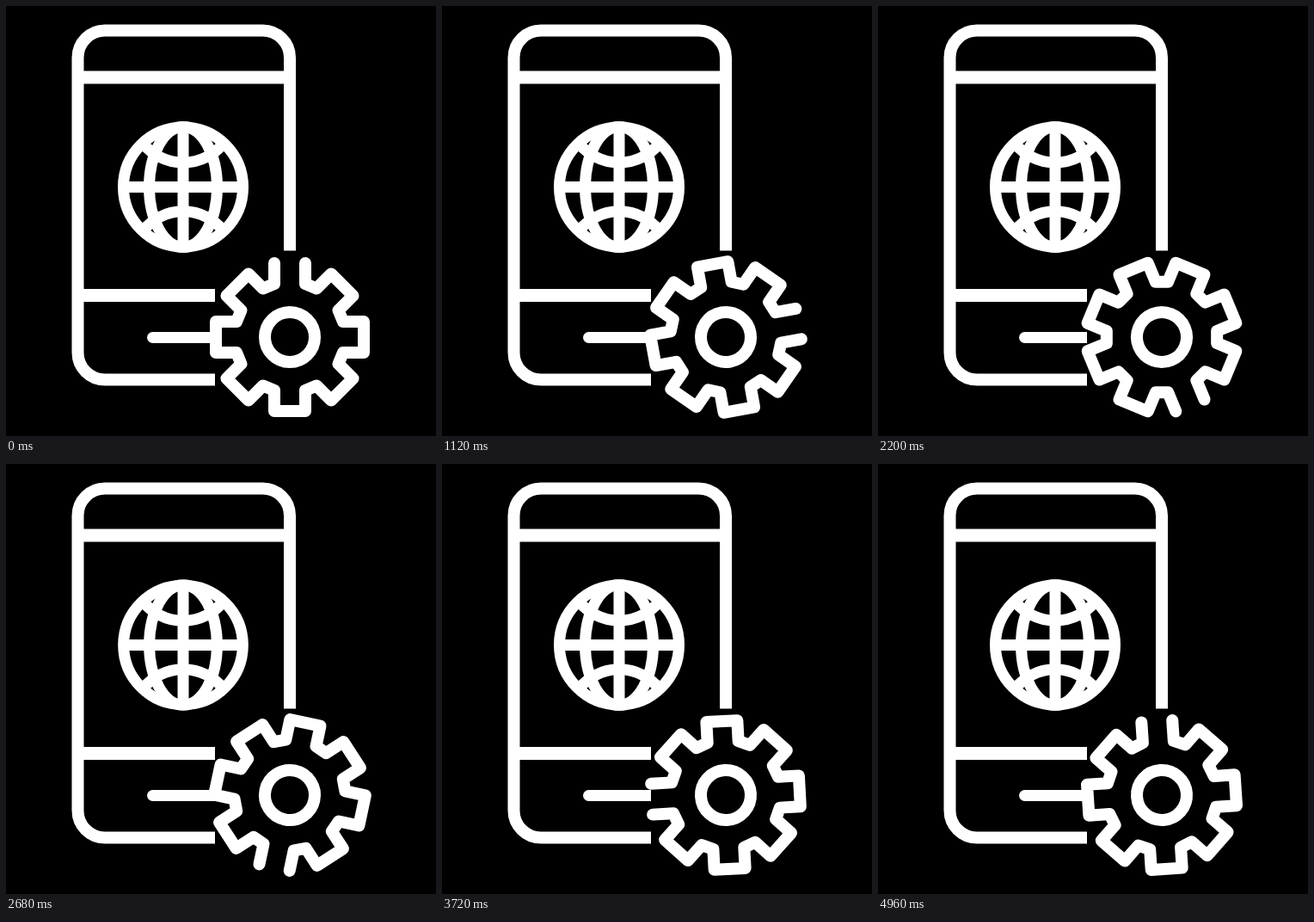
Recreate the animation shown at these times as an HTML page. Size 500 by 500 pixels, loop 5 s.

```html
<!DOCTYPE html>
<html lang="en">
<head>
<meta charset="utf-8">
<title>Mobile web settings</title>
<style>
  html, body { margin: 0; width: 100%; height: 100%; overflow: hidden; background: #000; }
  svg { display: block; width: 100vw; height: 100vh; }
</style>
</head>
<body>
<svg viewBox="0 0 500 500" fill="none" stroke="#fff" stroke-width="14">
  <g id="phone">
    <path d="M243 434.5H115a31.5 31.5 0 0 1-31.5-31.5V60A31.5 31.5 0 0 1 115 28.5H298.500A31.5 31.5 0 0 1 330 60V284.500"/>
    <path d="M84 83H330M84 336.500H243" stroke-width="15"/>
    <path d="M243 379H170.500a6.500 6.500 0 0 0 0 13H243z" fill="#fff" stroke="none"/>
  </g>
  <g id="globe" stroke-width="13">
    <circle r="69.5"/>
    <ellipse rx="39.5" ry="70"/>
    <path d="M0-70V70M-70 0H70"/>
    <path d="M-47-51A60 60 0 0 0 47-51M-47 51A60 60 0 0 1 47 51"/>
  </g>
  <g id="gear" stroke-linecap="round" stroke-linejoin="round">
    <path id="teeth"/>
    <circle r="29"/>
  </g>
</svg>
<script>
const LOOP = 5000, LAG = 14, PULSE = 1000, STARTS = [0, 2640], DIP = 0.14;
const TEETH = 8, HALF = 18, TIP = 86, ROOT = 62;
const byId = id => document.getElementById(id);
const globe = byId('globe'), gear = byId('gear');

function turn(x, y, a) {
  const c = Math.cos(a), s = Math.sin(a);
  return (x * c - y * s).toFixed(2) + ' ' + (x * s + y * c).toFixed(2);
}

// The outline starts and ends at the tip of the first tooth, leaving it open.
function gearPath() {
  const pts = [];
  for (let i = 0; i < TEETH; i++) {
    const a = i * 2 * Math.PI / TEETH, b = (i + 1) * 2 * Math.PI / TEETH;
    pts.push(turn(HALF, -TIP, a), turn(HALF, -ROOT, a),
             turn(-HALF, -ROOT, b), turn(-HALF, -TIP, b));
  }
  return 'M' + pts.join('L');
}

function globeScale(t) {
  const start = STARTS.find(s => t >= s && t < s + PULSE);
  if (start === undefined) return 1;
  return 1 - DIP * (1 - Math.cos(2 * Math.PI * (t - start) / PULSE)) / 2;
}

function draw(now) {
  const t = now % LOOP;
  const angle = 360 * Math.max(0, t - LAG) / LOOP;
  gear.setAttribute('transform', `translate(330 385) rotate(${angle})`);
  globe.setAttribute('transform', `translate(206 210.5) scale(${globeScale(t)})`);
}

function frame() {
  draw(performance.now());
  requestAnimationFrame(frame);
}

byId('teeth').setAttribute('d', gearPath());
draw(0);
requestAnimationFrame(frame);
</script>
</body>
</html>
```
